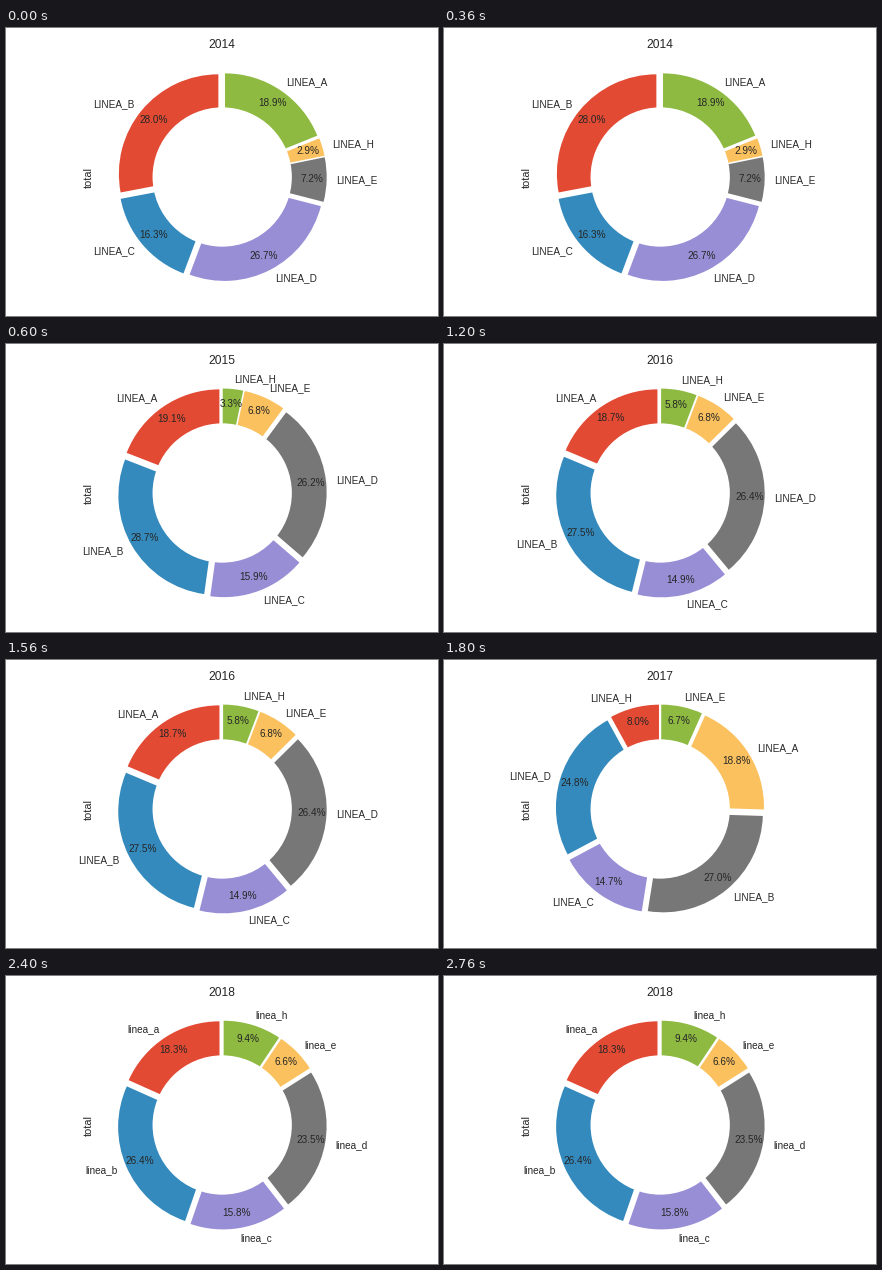
A matplotlib script that plays this animation: 432x288 px, repeating every 3 s.

```python
import matplotlib.pyplot as plt
from matplotlib.animation import FuncAnimation
from matplotlib.patches import Circle

W, H, DPI = 432, 288, 72
CX, CY, R = 216.2, 149, 99.5  # ring centre and radius in pixels
HALF = 1.25 * R
INK = "#262626"
COLORS = ["#E24A33", "#348ABD", "#988ED5", "#777777", "#FBC15E", "#8EBA42"]

# year, line letters counterclockwise from the top, their shares
YEARS = [
    ("2014", "BCDEHA", [28.0, 16.3, 26.7, 7.2, 2.9, 18.9]),
    ("2015", "ABCDEH", [19.1, 28.7, 15.9, 26.2, 6.8, 3.3]),
    ("2016", "ABCDEH", [18.7, 27.5, 14.9, 26.4, 6.8, 5.8]),
    ("2017", "HDCBAE", [8.0, 24.8, 14.7, 27.0, 18.8, 6.7]),
    ("2018", "abcdeh", [18.3, 26.4, 15.8, 23.5, 6.6, 9.4]),
]

plt.rcParams["font.family"] = "Liberation Sans"
plt.rcParams["text.color"] = INK

fig = plt.figure(figsize=(W / DPI, H / DPI), dpi=DPI, facecolor="white")
ax = fig.add_axes([(CX - HALF) / W, 1 - (CY + HALF) / H,
                   2 * HALF / W, 2 * HALF / H])


def line_name(letter):
    prefix = "linea_" if letter.islower() else "LINEA_"
    return prefix + letter


def pixel_text(x, y, text, **style):
    fig.text(x / W, 1 - y / H, text, **style)


def draw(i):
    year, letters, shares = YEARS[i]
    ax.clear()
    for old in list(fig.texts):
        old.remove()
    ax.pie(shares, labels=[line_name(c) for c in letters], colors=COLORS,
           explode=[0.05] * len(shares), startangle=90,
           autopct="%1.1f%%", pctdistance=0.85, labeldistance=1.1,
           wedgeprops={"linewidth": 0}, textprops={"fontsize": 10})
    ax.add_patch(Circle((0, 0), 0.7, facecolor="white", linewidth=0))
    pixel_text(216, 19.6, year, fontsize=12, ha="center", va="baseline")
    pixel_text(88, CY, "total", fontsize=11, rotation=90,
               ha="right", va="center")
    return []


anim = FuncAnimation(fig, draw, frames=len(YEARS), interval=600,
                     init_func=lambda: draw(0), repeat=True, repeat_delay=0)
plt.show()
```
